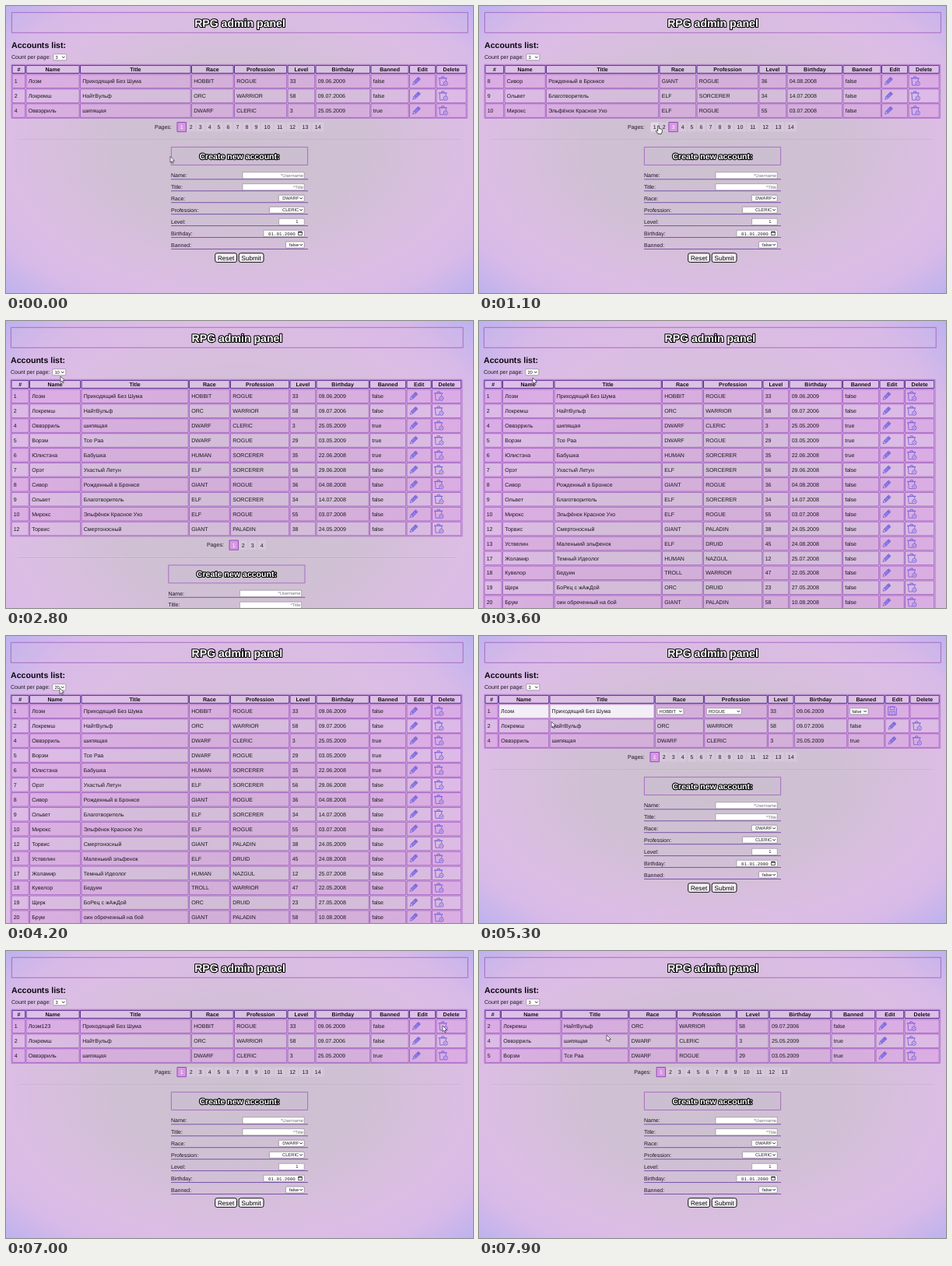
An HTML page with a canvas that plays this animation: 600x369 px, repeating every 8000 ms.

```html
<!DOCTYPE html>
<html lang="en">
<head>
<meta charset="utf-8">
<title>RPG admin panel</title>
<style>
html, body { margin: 0; width: 100%; height: 100%; overflow: hidden; background: #d8bfe0; }
canvas { display: block; width: 600px; height: 369px; }
</style>
</head>
<body>
<canvas id="stage"></canvas>
<script>
const W = 600, H = 369, LOOP = 8000;
const canvas = document.getElementById('stage');
const dpr = window.devicePixelRatio || 1;
canvas.width = W * dpr;
canvas.height = H * dpr;
const ctx = canvas.getContext('2d');
const SANS = '"Liberation Sans", Arial, sans-serif';
const MONO = '"Liberation Mono", "DejaVu Sans Mono", monospace';
const BODY = 7.03, SMALL = 5.8, PITCH = 18.93;
const INK = '#1d1622', EDGE = '#a058c0', DARK = '#5f2f96';

const heads = ['#', 'Name', 'Title', 'Race', 'Profession', 'Level', 'Birthday', 'Banned', 'Edit', 'Delete'];
const accounts = `1|Лоэм|Приходящий Без Шума|HOBBIT|ROGUE|33|09.06.2009|false
2|Локремш|НайтВульф|ORC|WARRIOR|58|09.07.2006|false
4|Оввэрриль|шипящая|DWARF|CLERIC|3|25.05.2009|true
5|Ворэм|Тсе Раа|DWARF|ROGUE|29|03.05.2009|true
6|Юлистэна|Бабушка|HUMAN|SORCERER|35|22.06.2008|true
7|Орэт|Ухастый Летун|ELF|SORCERER|56|29.06.2008|false
8|Сивор|Рожденный в Бронксе|GIANT|ROGUE|36|04.08.2008|false
9|Ольвет|Благотворитель|ELF|SORCERER|34|14.07.2008|false
10|Мирокс|Эльфёнок Красное Ухо|ELF|ROGUE|55|03.07.2008|false
12|Торвис|Смертоносный|GIANT|PALADIN|38|24.05.2009|false
13|Уствелин|Маленький эльфенок|ELF|DRUID|45|24.08.2008|false
17|Жоламир|Темный Идеолог|HUMAN|NAZGUL|12|25.07.2008|false
18|Кувелор|Бедуин|TROLL|WARRIOR|47|22.05.2008|false
19|Щерк|БоРец с жАжДой|ORC|DRUID|23|27.05.2008|false
20|Брум|оин обреченный на бой|GIANT|PALADIN|58|10.08.2008|false`
  .split('\n').map(line => line.split('|'));

// Left edges of the columns, then the right edge of the table
const cols = {
  first: [8, 26, 95.5, 238.5, 293.5, 362, 398, 469, 518.5, 553, 592.5],
  third: [8, 33, 86.5, 232, 280, 360, 396, 468, 517.5, 552, 592.5],
  five: [7, 24.5, 91.3, 230, 284.5, 362, 396, 466, 513.7, 546.7, 586],
  many: [7, 30.5, 97, 235.5, 288.5, 365, 399, 467.5, 515, 547.5, 586],
  edit: [8, 25.5, 91, 226.3, 289.7, 371.5, 405.3, 474, 522, 554, 592.5],
  last: [8, 28.5, 106.3, 193, 254.5, 331.5, 373.3, 453, 510, 547, 592.5]
};

const steps = [
  { at: 0, cols: 'first', count: 3, page: 1 },
  { at: 520, cols: 'first', count: 3, page: 2 },
  { at: 820, cols: 'third', count: 3, page: 3 },
  { at: 1220, cols: 'first', count: 3, page: 1 },
  { at: 1900, cols: 'five', count: 5, page: 1 },
  { at: 2780, cols: 'many', count: 10, page: 1 },
  { at: 3500, cols: 'many', count: 20, page: 1 },
  { at: 4220, cols: 'first', count: 3, page: 1 },
  { at: 4760, cols: 'edit', count: 3, page: 1, edit: true },
  { at: 6650, cols: 'first', count: 3, page: 1 },
  { at: 7300, cols: 'last', count: 3, page: 1, removed: true }
];

// Pointer stops: time, x, y
const stops = [
  [0, 211, 193.5], [200, 211, 193.5], [480, 238, 154], [560, 238, 154], [780, 250, 154],
  [860, 250, 154], [1090, 230.5, 154], [1250, 230.5, 154], [1550, 69, 64], [1650, 69, 64],
  [1880, 70, 69], [2100, 70, 69], [2350, 69, 64], [2500, 69, 64], [2750, 70, 71],
  [2900, 70, 71], [3100, 69, 64], [3250, 69, 64], [3480, 69, 73], [3650, 69, 73],
  [3900, 69, 64], [4000, 69, 64], [4200, 69, 67], [4280, 69, 67], [4700, 526, 96],
  [4820, 526, 96], [5290, 93, 110], [5330, 93, 110], [5500, 62, 98], [6050, 62, 98],
  [6290, 558, 95], [6330, 558, 95], [6550, 531, 96], [6700, 531, 96], [7000, 561, 96],
  [7350, 561, 96], [7850, 164, 108], [8000, 164, 108]
];

function pointer(t) {
  let i = 0;
  while (i < stops.length - 2 && t >= stops[i + 1][0]) i++;
  const [t0, x0, y0] = stops[i], [t1, x1, y1] = stops[i + 1];
  const k = (t - t0) / (t1 - t0), e = k * k * (3 - 2 * k);
  return { x: x0 + (x1 - x0) * e, y: y0 + (y1 - y0) * e };
}

function text(s, x, mid, { size = BODY, bold = false, align = 'left', color = INK, font = SANS } = {}) {
  ctx.font = `${bold ? 'bold ' : ''}${size}px ${font}`;
  ctx.textAlign = align;
  ctx.fillStyle = color;
  ctx.fillText(s, x, mid + size * 0.36);
}

function outlined(s, x, mid, size) {
  ctx.font = `bold ${size}px ${SANS}`;
  ctx.textAlign = 'center';
  ctx.lineJoin = 'round';
  ctx.strokeStyle = '#000';
  ctx.lineWidth = 2.2;
  ctx.strokeText(s, x, mid + size * 0.36);
  ctx.fillStyle = '#fff';
  ctx.fillText(s, x, mid + size * 0.36);
}

function box(x, y, w, h, fill, stroke, line = 0.8, r = 0) {
  ctx.beginPath();
  ctx.roundRect(x, y, w, h, r);
  if (fill) { ctx.fillStyle = fill; ctx.fill(); }
  if (stroke) { ctx.strokeStyle = stroke; ctx.lineWidth = line; ctx.stroke(); }
}

function path(points, stroke, line, fill, close) {
  ctx.beginPath();
  for (let i = 0; i < points.length; i += 2) ctx.lineTo(points[i], points[i + 1]);
  if (close) ctx.closePath();
  if (fill) { ctx.fillStyle = fill; ctx.fill(); }
  if (stroke) { ctx.strokeStyle = stroke; ctx.lineWidth = line; ctx.stroke(); }
}

function select(x, mid, w, label, alignRight) {
  box(x, mid - 4, w, 8, '#fff', '#77717d', 0.6, 1);
  text(label, alignRight ? x + w - 7 : x + 2.6, mid, { size: SMALL, align: alignRight ? 'right' : 'left' });
  const a = x + w - 4;
  path([a - 1.7, mid - 0.9, a, mid + 0.9, a + 1.7, mid - 0.9], '#111', 0.9);
}

function background(pageH, width) {
  ctx.save();
  ctx.translate(width / 2, pageH / 2);
  ctx.scale(width / Math.SQRT2, pageH / Math.SQRT2);
  const g = ctx.createRadialGradient(0, 0, 0, 0, 0, 1);
  g.addColorStop(0, '#ccc1cf');
  g.addColorStop(0.38, '#d0c0d4');
  g.addColorStop(0.7, '#dcbde4');
  g.addColorStop(0.84, '#d8bae8');
  g.addColorStop(1, '#bdb2ee');
  ctx.fillStyle = g;
  ctx.fillRect(-1, -1, 2, 2);
  ctx.restore();
}

function at(x, y, draw) {
  ctx.save();
  ctx.translate(x, y);
  ctx.lineJoin = 'round';
  draw();
  ctx.restore();
}

const BLUE = '#7a63dc';

function pencil(x, y) {
  at(x, y, () => {
    ctx.rotate(Math.PI / 4);
    box(-1.9, -5.2, 3.8, 8.4, '#8d79e4', BLUE, 0.8, 0.8);
    path([-1.9, 3.2, 0, 7, 1.9, 3.2], BLUE, 0.8, '#c9b4ee', true);
    path([-1.9, -3.2, 1.9, -3.2], '#6650cc', 0.8);
  });
}

function trash(x, y) {
  at(x, y, () => {
    path([-6, -3.4, 5, -3.4], BLUE, 1.2);
    path([-2.4, -3.6, -1.8, -5.4, 1, -5.4, 1.6, -3.6], BLUE, 1);
    path([-4.6, -3, -4, 5.6, 1, 5.6], BLUE, 0.9);
    path([3.8, -3, 3.5, 0.5], BLUE, 0.9);
    ctx.beginPath();
    ctx.arc(3.2, 3.4, 2.7, 0, 7);
    ctx.strokeStyle = BLUE;
    ctx.lineWidth = 0.9;
    ctx.stroke();
    path([2.2, 2.4, 4.2, 4.4], BLUE, 0.7);
    path([4.2, 2.4, 2.2, 4.4], BLUE, 0.7);
  });
}

function disk(x, y) {
  at(x, y, () => {
    path([-5.3, -5.3, 3.6, -5.3, 5.3, -3.6, 5.3, 5.3, -5.3, 5.3], BLUE, 1, null, true);
    box(-2.8, -5.3, 5.4, 3.5, null, BLUE, 0.8);
    box(-3.3, 0.4, 6.6, 4.9, null, BLUE, 0.8);
    path([-1.8, 2, 1.8, 2], BLUE, 0.6);
    path([-1.8, 3.6, 1.8, 3.6], BLUE, 0.6);
  });
}

function editRow(x, mid, row, t) {
  const focus = t >= 5520;
  const typed = '123'.slice(0, Math.max(0, Math.min(3, Math.floor((t - 5550) / 150))));
  const name = row[1] + typed;
  box(x[2] + 0.6, mid - 8.4, x[3] - x[2] - 2.4, 16.8, '#f4eff6', '#d5c8da', 0.5);
  box(x[1] + 0.6, mid - 8.4, x[2] - x[1] - 2.4, 16.8, focus ? '#fbf8fc' : '#f4eff6',
    focus ? '#151018' : '#d5c8da', focus ? 1.3 : 0.5, focus ? 1.2 : 0);
  text(name, x[1] + 2.6, mid);
  text(row[2], x[2] + 2.6, mid);
  if (focus) {
    ctx.font = `${BODY}px ${SANS}`;
    const cx = x[1] + 3 + ctx.measureText(name).width;
    path([cx, mid - 3.8, cx, mid + 3.6], '#111', 0.6);
  }
  select(x[3] + 2.6, mid, 34, row[3]);
  select(x[4] + 2.6, mid, 45, row[4]);
  select(x[7] + 2.6, mid, 23.5, row[7]);
  disk(x[8] + 9, mid - 0.5);
}

function table(s, rows, t) {
  const x = cols[s.cols], n = s.count;
  box(x[0] - 1, 75.2, x[10] - x[0] + 1.2, 12.4 + n * PITCH, null, EDGE, 0.6);
  heads.forEach((h, c) => {
    const w = x[c + 1] - x[c] - 1.3;
    box(x[c], 76.4, w, 10, 'rgba(225,200,235,.3)', DARK, 1);
    text(h, x[c] + w / 2, 81.5, { bold: true, align: 'center', color: '#120a18' });
  });
  for (let r = 0; r < n; r++) {
    const mid = 96.8 + r * PITCH;
    if (mid > H + 12) break;
    const fill = r % 2 ? 'rgba(222,180,232,.28)' : 'rgba(218,150,226,.42)';
    for (let c = 0; c < 10; c++) box(x[c], mid - 8.9, x[c + 1] - x[c] - 1.3, 17.6, fill, EDGE, 0.8);
    const row = rows[r];
    if (!row) continue;
    const editing = s.edit && r === 0;
    row.forEach((v, c) => {
      if (!editing || [0, 5, 6].includes(c)) text(v, x[c] + 2.7, mid);
    });
    if (editing) editRow(x, mid, row, t);
    else {
      pencil(x[8] + 9, mid - 0.5);
      trash(x[9] + 8.6, mid - 0.5);
    }
  }
}

// Returns true when the pointer is over one of the buttons
function pager(s, cx, y, mouse) {
  const pages = Math.ceil((s.removed ? 39 : 40) / s.count);
  const width = p => p < 10 ? 11.95 : 16.3;
  let total = 29;
  for (let p = 1; p <= pages; p++) total += width(p);
  let x = cx - total / 2, over = false;
  text('Pages:', x, y - 0.3);
  x += 29;
  for (let p = 1; p <= pages; p++) {
    const w = width(p), now = p === s.page;
    const hit = mouse.x >= x && mouse.x < x + w && Math.abs(mouse.y - y) < 6.5;
    over = over || hit;
    if (now) box(x, y - 6, w - 0.5, 12.2, '#d797e2', '#8a42b0', 0.9);
    else box(x + 0.5, y - 6, w - 1.2, 12, hit ? 'rgba(255,255,255,.4)' : 'rgba(235,215,240,.3)');
    text(p, x + w / 2 - 0.2, y + 0.3, { align: 'center', color: now ? '#fff' : INK });
    x += w;
  }
  return over;
}

function form(dx, dy) {
  at(dx, dy, () => {
    box(212.4, 181.4, 175.2, 23, 'rgba(200,185,210,.35)', EDGE, 0.8);
    outlined('Create new account:', 300, 192.8, 10.55);
    ['Name:', 'Title:', 'Race:', 'Profession:', 'Level:', 'Birthday:', 'Banned:'].forEach((label, i) => {
      const y = 217.5 + i * 14.95;
      text(label, 212, y);
      path([212, y + 5.3, 388, y + 5.3], '#7048a4', 0.9);
    });
    const input = (x, y) => box(x, y - 4.1, 383.2 - x, 8.2, '#fff', '#8b838f', 0.6);
    ['*Username', '*Title'].forEach((hint, i) => {
      const y = 217.8 + i * 14.95;
      input(304, y);
      text(hint, 382, y, { size: SMALL, align: 'right', color: '#77727a' });
    });
    select(350.3, 247.2, 32.9, 'DWARF', true);
    select(338.4, 262.2, 44.8, 'CLERIC', true);
    input(350.6, 277.4);
    text('1', 375.4, 277.4, { size: SMALL, align: 'right' });
    input(331, 292.4);
    text('01.01.2000', 337, 292.6, { size: SMALL, font: MONO });
    box(375.6, 290.2, 4.8, 4.4, null, '#111', 0.7);
    path([375.6, 290.8, 380.4, 290.8], '#111', 1.2);
    select(359.4, 307, 23.8, 'false', true);
    box(268.7, 317.8, 27.8, 11.6, '#f5f1f6', '#111', 1, 2.4);
    text('Reset', 282.6, 323.6, { size: 8.1, align: 'center', color: '#000' });
    box(299.2, 317.8, 31.8, 11.6, '#f5f1f6', '#111', 1, 2.4);
    text('Submit', 315.1, 323.6, { size: 8.1, align: 'center', color: '#000' });
  });
}

function arrow({ x, y }) {
  at(x, y, () => path([0, 0, 0, 7.6, 1.8, 6, 3, 8.8, 4.3, 8.2, 3.1, 5.6, 5.5, 5.5], '#33303a', 0.7, '#fff', true));
}

function hand({ x, y }) {
  at(x, y, () => path([-0.8, 0, 0.8, 0, 0.9, 3.6, 3.8, 4.2, 5, 5.2, 4.6, 8.4, 3.6, 10.4, -0.6, 10.4,
    -3.2, 6.6, -2.4, 5.8, -0.9, 7], '#222', 0.8, '#fff', true));
}

function draw(t) {
  const s = steps.filter(step => step.at <= t).pop();
  const width = s.count > 3 ? 592.8 : 600, cx = width / 2;
  const dy = (s.count - 3) * PITCH;
  const mouse = pointer(t);
  const left = s.count > 3 ? 6.4 : 7.4;

  ctx.setTransform(dpr, 0, 0, dpr, 0, 0);
  ctx.textBaseline = 'alphabetic';
  ctx.textRendering = 'geometricPrecision';
  ctx.fillStyle = '#c6b6ec';
  ctx.fillRect(0, 0, W, H);
  background(Math.max(H, 338 + dy), W);

  box(left, 8.3, width - 2 * left + 0.8, 26, 'rgba(215,185,228,.25)', EDGE, 0.8);
  outlined('RPG admin panel', cx + 0.5, 21.6, 14.1);
  text('Accounts list:', left - 0.4, 50.2, { size: 10.6, bold: true, color: '#0b0710' });
  text('Count per page:', left - 0.4, 65.4);
  select(left + 53.4, 65.8, 17, s.count);

  const start = s.removed ? 1 : (s.page - 1) * s.count;
  let rows = accounts.slice(start, start + s.count);
  if (t >= 6650 && !s.removed) {
    const [id, name, ...rest] = rows[0];
    rows = [[id, name + '123', ...rest], ...rows.slice(1)];
  }
  table(s, rows, t);
  const over = pager(s, cx, 155.5 + dy, mouse);
  path([left + 8.5, 172 + dy, width - left - 8.5, 172 + dy], 'rgba(140,125,150,.45)', 0.6);
  path([left + 8.5, 172.7 + dy, width - left - 8.5, 172.7 + dy], 'rgba(255,255,255,.35)', 0.5);
  form(cx - 300, dy);
  (over ? hand : arrow)(mouse);
}

const begin = performance.now();
function tick() {
  draw((performance.now() - begin) % LOOP);
  requestAnimationFrame(tick);
}
tick();
</script>
</body>
</html>
```
